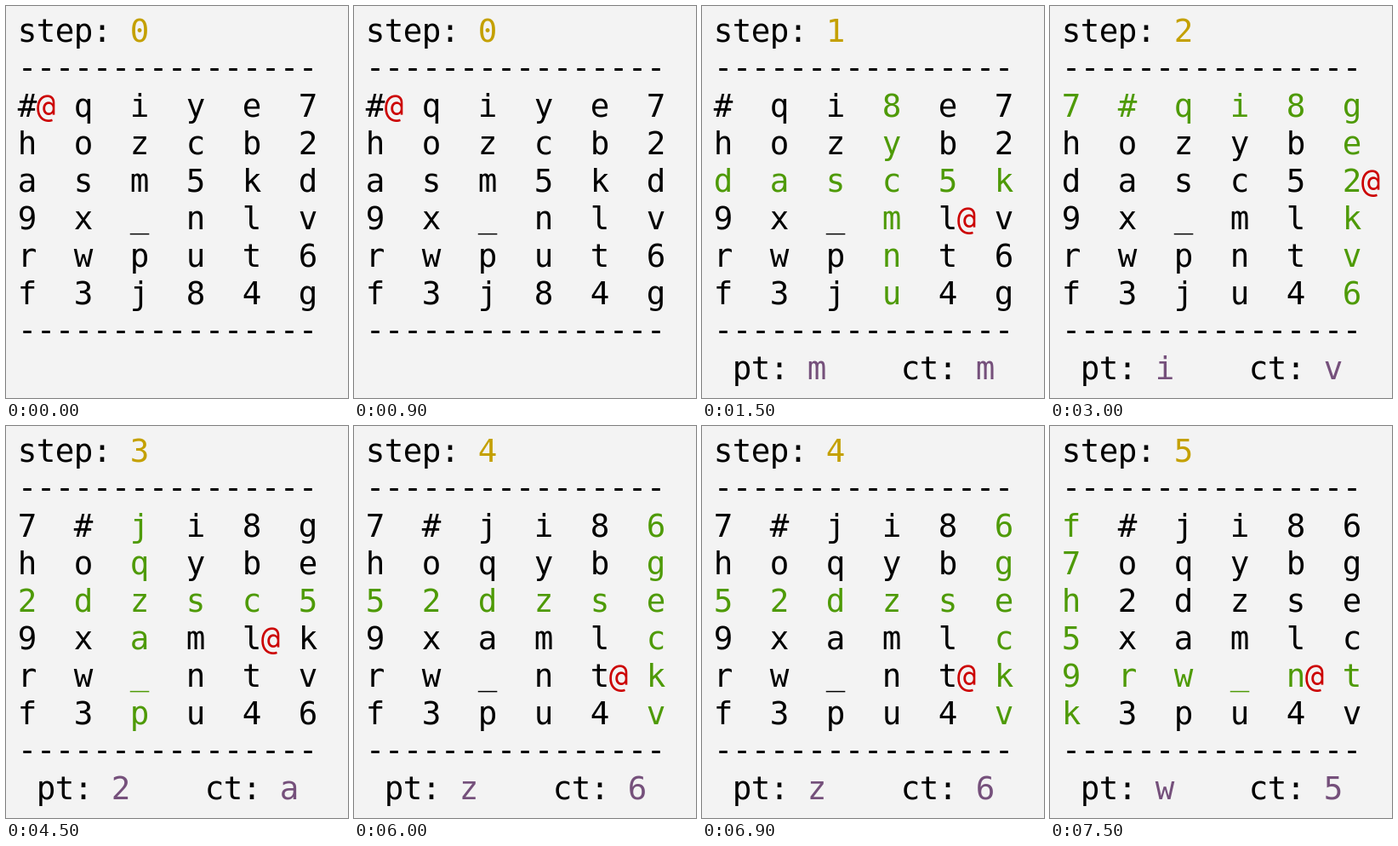
Recreate the animation shown at these times as an HTML page. Size 402 by 460 pixels, loop 8 s.

```html
<!DOCTYPE html>
<html lang="en">
<head>
<meta charset="utf-8">
<title>Grid cipher, step by step</title>
<style>
  html, body { margin: 0; width: 100%; height: 100%; overflow: hidden; background: #f3f3f3; }
  svg { display: block; }
  text {
    font: 37.5px "DejaVu Sans Mono", "Noto Sans Mono", monospace;
    text-anchor: middle;
    white-space: pre;
  }
</style>
</head>
<body>
<svg id="stage" width="402" height="460" viewBox="0 0 402 460"></svg>
<script>
const LOOP = 8000, HOLD = 1500, SIZE = 6;
const ALPHABET = '#_23456789abcdefghijklmnopqrstuvwxyz';
const KEY = '#qiye7hozcb2asm5kd9x_nlvrwput6f3j84g';
const MESSAGE = 'mi2zw';
const BLACK = '#000', RED = '#cc0000', GREEN = '#4e9a06', YELLOW = '#c4a000', PURPLE = '#75507b';
const LIFT = { '-': 1.5, '_': 3 };

const stage = document.getElementById('stage');
const mod = n => n % SIZE;
const offset = char => {
  const n = ALPHABET.indexOf(char);
  return { right: mod(n), down: Math.floor(n / SIZE) };
};
const locate = (grid, char) => {
  const row = grid.findIndex(line => line.includes(char));
  return { row, col: grid[row].indexOf(char) };
};

// Encrypt one character: rotate its row, then the output's column, then move the marker.
function advance(state, plain) {
  const grid = state.grid.map(line => [...line]);
  let { row, col } = state.marker;
  const from = locate(grid, plain);
  const shift = offset(grid[row][col]);
  const cipher = grid[mod(from.row + shift.down)][mod(from.col + shift.right)];

  grid[from.row].unshift(grid[from.row].pop());
  if (row === from.row) col = mod(col + 1);

  const column = locate(grid, cipher).col;
  const tiles = grid.map(line => line[column]);
  tiles.unshift(tiles.pop());
  tiles.forEach((tile, r) => { grid[r][column] = tile; });
  if (col === column) row = mod(row + 1);

  const move = offset(cipher);
  const marker = { row: mod(row + move.down), col: mod(col + move.right) };
  return { grid, marker, plain, cipher, row: from.row, column };
}

const states = [{
  grid: Array.from({ length: SIZE }, (_, r) => [...KEY.slice(r * SIZE, (r + 1) * SIZE)]),
  marker: { row: 0, col: 0 }
}];
for (const plain of MESSAGE) states.push(advance(states.at(-1), plain));

// Write characters on the terminal grid of 22 by 44 pixel cells.
function write(string, col, line, color = BLACK) {
  [...string].forEach((char, i) => {
    if (char === ' ') return;
    const text = document.createElementNS('http://www.w3.org/2000/svg', 'text');
    text.setAttribute('x', 25 + 22 * (col + i));
    text.setAttribute('y', 42 + 44 * line - (LIFT[char] || 0));
    text.setAttribute('fill', color);
    text.textContent = char;
    stage.append(text);
  });
}

function draw(step) {
  const { grid, marker, plain, cipher, row, column } = states[step];
  stage.replaceChildren();
  write('step:', 0, 0);
  write(String(step), 6, 0, YELLOW);
  write('-'.repeat(16), 0, 1);
  grid.forEach((line, r) => line.forEach((char, c) =>
    write(char, c * 3, r + 2, r === row || c === column ? GREEN : BLACK)));
  write('@', marker.col * 3 + 1, marker.row + 2, RED);
  write('-'.repeat(16), 0, 8);
  if (!plain) return;
  write('pt:', 1, 9);
  write(plain, 5, 9, PURPLE);
  write('ct:', 10, 9);
  write(cipher, 14, 9, PURPLE);
}

let shown = 0;
const start = performance.now();
draw(0);

function tick() {
  const step = Math.floor((performance.now() - start) % LOOP / HOLD);
  if (step !== shown) draw(shown = step);
  requestAnimationFrame(tick);
}
requestAnimationFrame(tick);
</script>
</body>
</html>
```
